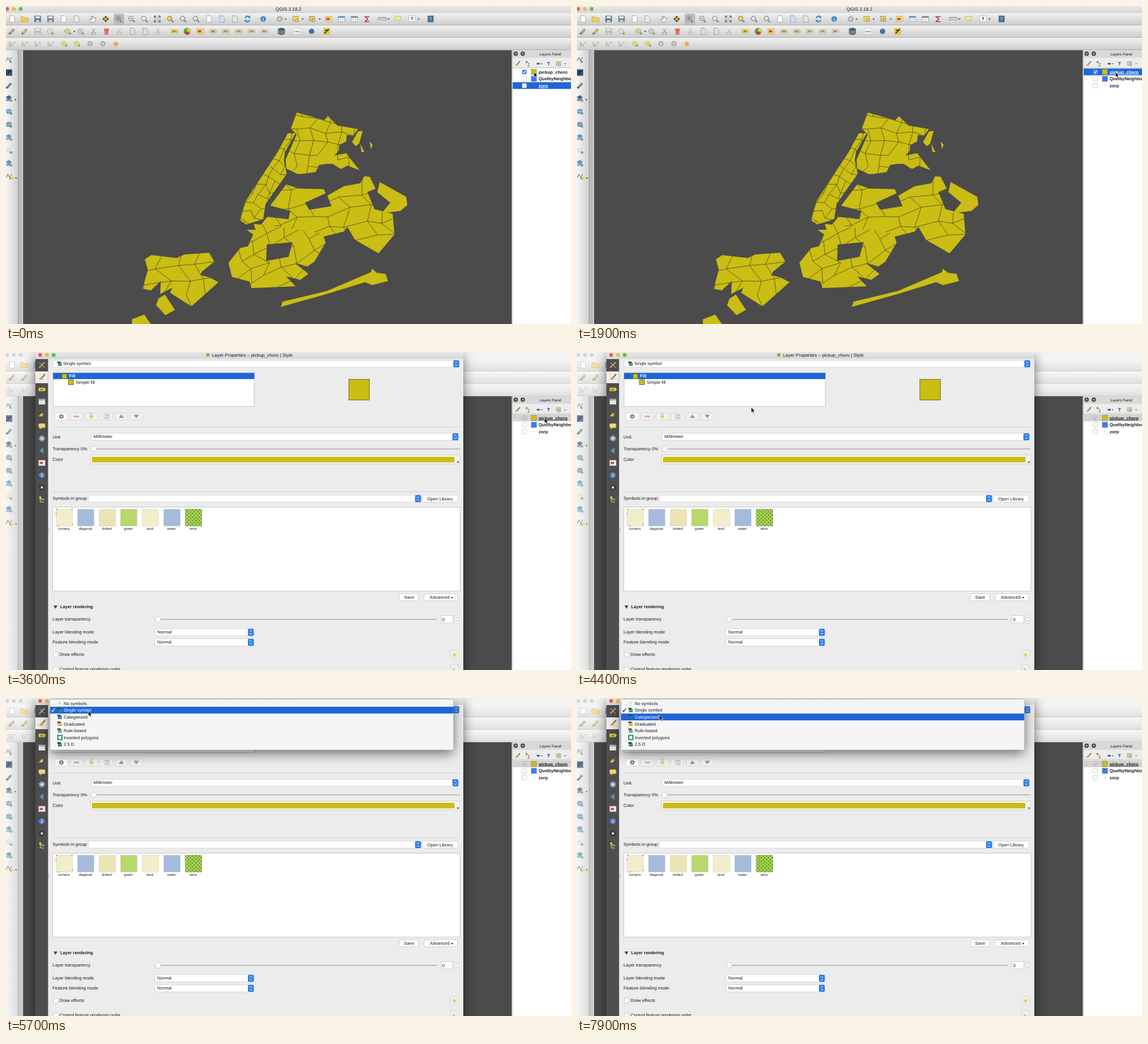
An HTML page that plays this animation: 960 px wide and 540 px high, repeating every 8000 ms.

```html
<!DOCTYPE html>
<html lang="en">
<head>
<meta charset="utf-8">
<title>Layer styling</title>
<style>
html, body { margin: 0; width: 100%; height: 100%; overflow: hidden; background: #4b4b4b; }
svg { display: block; width: 960px; height: 540px; }
text { font-family: "Liberation Sans", Arial, sans-serif; fill: #1c1c1c; text-rendering: geometricPrecision; white-space: pre; }
.timed { animation: 8s step-end infinite; }
.points { animation-name: points; }
.choro { animation-name: choro; }
.dialog { animation-name: dialog; }
.popup { animation-name: popup; }
.single { animation-name: single; }
.categorized { animation-name: categorized; }
.shadow { filter: drop-shadow(0 6px 10px rgba(0,0,0,.55)); }
.cursor { animation: cursor 8s ease-in-out infinite; }
@keyframes points { 0% { opacity: 1 } 5%, to { opacity: 0 } }
@keyframes choro { 0% { opacity: 0 } 5% { opacity: 1 } 44.8%, to { opacity: 0 } }
@keyframes dialog { 0% { opacity: 0 } 44.8%, to { opacity: 1 } }
@keyframes popup { 0% { opacity: 0 } 69.8%, to { opacity: 1 } }
@keyframes single { 0% { opacity: 0 } 69.8% { opacity: 1 } 86%, to { opacity: 0 } }
@keyframes categorized { 0% { opacity: 0 } 86%, to { opacity: 1 } }
@keyframes cursor {
  0%, 12.5% { transform: translate(897px,112px) }
  16.25%, 51.2% { transform: translate(915px,112px) }
  55%, 57.2% { transform: translate(296px,94px) }
  60%, 66.25% { transform: translate(141px,40px) }
  68.75%, 85% { transform: translate(140px,22px) }
  86.25%, to { transform: translate(140px,29px) }
}
</style>
</head>
<body>
<svg id="stage" viewBox="0 0 960 540"></svg>
<script>
const YELLOW = '#cabd13', BLUE = '#1f66d8', DARK = '#4b4b4b', INK = '#1c1c1c';
const BOLD = 'font-weight="700"', MID = 'text-anchor="middle"', WHITE = 'style="fill:#fff"';

const rect = (x, y, w, h, fill, more = '') => `<rect x="${x}" y="${y}" width="${w}" height="${h}" fill="${fill}" ${more}/>`;
const circle = (x, y, r, fill, more = '') => `<circle cx="${x}" cy="${y}" r="${r}" fill="${fill}" ${more}/>`;
const path = (d, fill, more = '') => `<path d="${d}" fill="${fill}" ${more}/>`;
const edge = (color, width = .7) => `stroke="${color}" stroke-width="${width}"`;
const line = (d, color, width = 1) => path(d, 'none', edge(color, width));
const text = (x, y, s, size = 7.55, more = '') => `<text x="${x}" y="${y}" font-size="${size}" ${more}>${s}</text>`;
const group = (inner, more = '') => `<g ${more}>${inner}</g>`;
const timed = (name, inner) => group(inner, `class="timed ${name}"`);

// Each glyph is centred on 0,0 and tinted with one colour.
const glyphs = {
  gap: () => '',
  doc: c => path('M-4-6H2L5-3V6H-4Z', c, edge('#8b8b8b')),
  folder: c => path('M-7-4H-2L0-2H6V5H-7Z', c, edge('#b3923a')),
  disk: c => rect(-6, -6, 12, 12, c, 'rx="1"') + rect(-4, -5, 8, 4, '#e4e8ec') + rect(-3, 2, 6, 4, '#d0d4d8'),
  lens: c => line('M2 2L6 6', '#777', 2) + circle(-1, -1, 4.2, c, edge('#777', 1.1)),
  plus: c => glyphs.lens(c) + line('M-3-1H1M-1-3V1', '#345'),
  minus: c => glyphs.lens(c) + line('M-3-1H1', '#345'),
  hand: c => path('M-3 6L-6 0-2 1-3-5 0-1 0-6 3-1 5-3 5 2 3 6Z', c, edge('#666')),
  cross: c => path('M0-6L6 0 0 6-6 0Z', c) + line('M-5-5L5 5M-5 5L5-5', '#f1d04e', 1.5),
  expand: c => line('M-5-2V-5H-2M2-5H5V-2M5 2V5H2M-2 5H-5V2', c, 2) + circle(0, 0, 2.6, '#dce4ea', edge('#777')),
  ring: c => line('M-4-2A4.5 4.5 0 0 1 4-3M4 2A4.5 4.5 0 0 1-4 3', c, 2.3) + path('M5-6V-1L1-2ZM-5 6V1L-1 2Z', c),
  info: c => circle(0, 0, 5.2, c) + text(0, 3, 'i', 8, `${MID} ${WHITE} ${BOLD}`),
  gear: c => circle(0, 0, 3.4, '#e6e6e6', edge(c, 2.4)) + circle(0, 0, 5.2, 'none', edge(c, 1.6) + ' stroke-dasharray="2 2.1"'),
  select: c => rect(-6, -5, 10, 9, c, edge('#96853a')) + path('M0-1V6L2 4 5 4Z', '#fff', edge('#444')),
  grid: c => rect(-6, -5, 12, 10, '#fff', edge('#888')) + rect(-6, -5, 12, 3, c) + line('M-6 1H6M-2-2V5M2-2V5', '#9aa', .6),
  sigma: c => line('M4-4H-4L1 0-4 5H4', c, 1.6),
  ruler: c => rect(-8, -3, 15, 5, c, edge('#777')) + line('M-5-3V0M-2-3V0M1-3V0M4-3V0', '#777', .7),
  bubble: c => rect(-6, -5, 12, 8, c, 'rx="2" ' + edge('#a39a68', .6)) + path('M-3 3H0L-4 6Z', c),
  letter: c => rect(-7, -6, 12, 11, c, edge('#aaa')) + text(-1, 2, 'T', 8, `${MID} ${BOLD}`),
  book: c => rect(-5, -6, 11, 12, c) + text(0, 3, '?', 9, `${MID} ${WHITE}`),
  pencil: c => line('M-4 5L4-4', '#8b7440', 4) + line('M-4 5L4-4', c, 2.5) + path('M-6 6L-5 2-2 4Z', '#555'),
  cut: c => line('M-3-5L3 3M3-5L-3 3', c) + circle(-3, 4, 1.7, 'none', edge(c)) + circle(3, 4, 1.7, 'none', edge(c)),
  trash: c => path('M-4-3H4L3 6H-3Z', c) + line('M-2-6H2M-1.5-1V4M1.5-1V4', '#f6c9c0', .8) + line('M-5-4H5', c, 1.5),
  tag: c => path('M-6-3H5L7 0 5 3H-6Z', c, edge('#a5943e', .6)) + text(0, 1.6, 'abc', 4.4, MID),
  card: c => rect(-6, -5, 12, 10, c, edge('#aaa')) + rect(-4, -2, 6, 4, '#d5483c'),
  pie: c => circle(0, 0, 6, c, edge('#333', .5)) + path('M0 0V-6A6 6 0 0 1 5 3Z', '#e5cf37') + path('M0 0L5 3A6 6 0 0 1-5 3Z', '#d4352d'),
  db: c => path('M-6-4Q0-8 6-4V4Q0 8-6 4Z', c, edge('#333')) + line('M-6-1Q0 2 6-1M-6 2Q0 5 6 2', '#c7d85a'),
  csw: c => rect(-6, -6, 13, 11, c, edge('#bbb')) + text(0, 2, 'CSW', 4.6, MID),
  dot: c => circle(0, 0, 5, c),
  square: c => rect(-6, -6, 12, 12, c) + line('M-4 4L4-4M-3-2H3', '#222', 1.6),
  bars: c => rect(-6, -5, 2, 11, c) + rect(-3, -1, 2, 7, '#b5b5b5') + rect(0, 1, 2, 5, c) + line('M2-2H7', '#a6a6a6', 1.5),
  node: c => path('M-5-3L0-5 4-2 3 3-2 4-6 1Z', c, edge('#9b9b55')) + circle(4, 4, 2.2, '#77b04c'),
  star: c => path('M0-6L2-2 6-1 3 2 4 6 0 4-4 6-3 2-6-1-2-2Z', c),
  caret: c => path('M-2-1H2L0 2Z', c),
  curve: c => line('M-5 3L-2-4 1 2 5-4', c) + circle(3, 4, 2, '#58a05a'),
  layer: c => path('M-6-3L1-6 5-2-1 2Z', c) + path('M-6 1L4-2V5H-6Z', c, 'opacity=".65"') + circle(4, 4, 2.3, '#83a663'),
  globe: c => circle(0, 0, 5, c) + line('M-5 0H5M0-5Q4 0 0 5Q-4 0 0-5', '#e4edf5', .8) + circle(4, 4, 2.2, '#6da05e'),
  brush: c => line('M1 0L6-6', '#76533a', 2) + path('M-6 4L0-2 3 1 0 5Z', c),
  wrench: c => line('M-5-5L5 5', '#c76b34', 2) + line('M5-5L-5 5', c, 1.8),
  horn: c => path('M-5 0L3-6V6Z', c),
  eye: c => path('M-5 0Q0-5 5 0Q0 5-5 0Z', c) + circle(1, 0, 1.5, '#222'),
  funnel: c => path('M-4-4H4L1 0V4H-1V0Z', c),
  stack: c => rect(-4, -4, 6, 3, '#333') + rect(-3, -2, 7, 2.6, c) + rect(-3, 1, 7, 2.8, c),
  tree: c => line('M-3-5V4H3M-3-1H3', '#ddd') + rect(-5, -6, 4, 4, c) + rect(0, -2, 4, 3, '#dd8e35') + rect(0, 3, 4, 3, '#5f9b4f')
};

const icon = (x, y, kind, color = '#555', scale = .92) => group(glyphs[kind](color), `transform="translate(${x} ${y}) scale(${scale})"`);
// A run of "glyph colour" items at an even pitch, along a row or down a column.
const run = (x, y, dx, dy, spec, scale) => spec.split(',').map((item, i) => {
  const [kind, color] = item.trim().split(' ');
  return icon(x + i * dx, y + i * dy, kind, color, scale);
}).join('');
const row = (x, y, spec, scale) => run(x, y, 21.9, 0, spec, scale);

// Land: an outline filled with a seeded, wobbly mesh of district borders.
let seed = 7;
const random = () => (seed = seed * 16807 % 2147483647) / 2147483647;
let islands = 0;
function island(outline, across = 0, along = across, angle = 0) {
  const d = `M${outline}Z`, shape = path(d, YELLOW);
  if (!across) return shape;
  const v = outline.match(/\d+/g).map(Number);
  const mid = k => { const p = v.filter((_, i) => i % 2 === k); return (Math.min(...p) + Math.max(...p)) / 2; };
  const cx = mid(0), cy = mid(1), n = 9, cos = Math.cos(angle), sin = Math.sin(angle);
  const grid = Array.from({ length: 2 * n }, (_, i) => Array.from({ length: 2 * n }, (_, j) => {
    const wobble = () => (random() - .5) * .5;
    const x = (i - n + wobble() + (j % 2) * .3) * across, y = (j - n + wobble()) * along;
    return (cx + x * cos - y * sin).toFixed(1) + ' ' + (cy + x * sin + y * cos).toFixed(1);
  }));
  let mesh = '';
  for (let i = 1; i < 2 * n; i++) for (let j = 1; j < 2 * n; j++) {
    if (random() < .9) mesh += `M${grid[i][j]}L${grid[i - 1][j]}`;
    if (random() < .85) mesh += `M${grid[i][j]}L${grid[i][j - 1]}`;
  }
  const id = 'land' + islands++;
  return `<clipPath id="${id}">${path(d, '#000')}</clipPath>` + shape + group(line(mesh, '#3d3b20', .7), `clip-path="url(#${id})"`);
}

const bronx = island('494,181 541,194 547,187 563,203 598,209 590,220 579,219 578,230 566,236 566,245 558,254 578,250 592,268 601,279 580,271 569,277 555,268 545,268 532,270 526,282 497,286 476,276 475,261 494,218 484,208', 24, 20, .15)
  + island('598,213 606,212 600,234 594,238 588,231') + island('602,234 609,248 604,248') + island('618,230 623,236 620,243');
const manhattan = island('479,216 492,216 474,248 472,262 477,285 441,336 437,362 408,371 398,364 406,333 430,296 461,249', 17, 13, -1.07);
const queens = island('449,339 476,303 497,310 540,311 543,318 508,334 515,346 553,340 546,322 574,306 602,301 609,289 618,290 628,310 614,316 626,345 657,353 660,388 633,420 593,397 580,375 574,383 538,392 443,404 428,378 444,358 480,362 483,348', 31, 27, -.2)
  + island('635,299 680,324 682,338 670,348 638,352 653,334 631,316');
const brooklyn = island('538,386 543,402 524,434 511,443 490,436 514,455 500,465 476,459 492,476 417,479 414,468 384,460 378,436 398,411 411,408 420,388 409,380 424,380 421,370 441,372', 30, 22, -.5)
  + path('M443,405 487,401 480,426 442,433Z', DARK);
const rockaway = island('467,511 470,502 545,484 620,452 622,446 630,453 645,455 649,467 622,474 610,469 545,489');
const staten = island('236,430 247,423 290,428 303,422 345,419 354,434 333,451 330,457 346,461 361,469 315,510 279,487 283,477 293,473 262,489 263,467 246,483 232,480 241,448', 33, 25, -.15)
  + island('259,497 270,490 287,516 271,525 255,508') + island('214,532 235,524 246,540 214,540');

const defs = `<defs>
<linearGradient id="bar" x2="0" y2="1"><stop stop-color="#f1f1f1"/><stop offset="1" stop-color="#cbcbcb"/></linearGradient>
<linearGradient id="title" x2="0" y2="1"><stop stop-color="#e9e9e9"/><stop offset="1" stop-color="#d6d6d6"/></linearGradient>
<linearGradient id="side"><stop stop-color="#f4f4f4"/><stop offset="1" stop-color="#d0d0d0"/></linearGradient>
<pattern id="dots" width="5" height="5" patternUnits="userSpaceOnUse"><rect width="5" height="5" fill="#f3edbf"/><circle cx="1.2" cy="1.2" r=".6" fill="#bd7b42"/><circle cx="3.7" cy="3.7" r=".6" fill="#a5a13f"/></pattern>
<pattern id="vines" width="6" height="6" patternUnits="userSpaceOnUse"><rect width="6" height="6" fill="#98d94a"/><path d="M1.5 0V2.4M4.5 3V5.4" stroke="#893f32" stroke-width="1.1"/></pattern>
</defs>`;

const lights = (x, colors = ['#f15b51', '#f3b93d', '#58c147']) => colors.map((c, i) => circle(x + i * 11.5, 5, 3.2, c)).join('');
const bar = y => rect(0, y, 960, 21, 'url(#bar)') + rect(0, y + 20.4, 960, .8, '#a7a7a7');
const toolbars = rect(0, 0, 960, 12, 'url(#title)') + bar(12) + bar(33) + bar(54)
  + lights(2) + text(480, 8, 'QGIS 2.18.2', 7.9, MID) + rect(183, 13, 18, 19, '#bcbcbc', 'rx="2"')
  + row(10, 22, 'doc #fff, folder #f2cf50, disk #5d7280, disk #708590, doc #fff, doc #e8eaee')
  + row(147.5, 22, 'hand #fff, cross #454b50, plus #a9cbe8, minus #e4eaf0, lens #eee, expand #55616a, lens #f0d552, lens #dce2e8, lens #dce2e8, doc #fafafa, doc #cce0f0, doc #e0e6ec, ring #3b89c2')
  + run(437, 22, 28, 0, 'info #4c86bd, gear #aaa, select #f3d64b, select #e2c95c') + run(475, 22, 29, 0, 'caret, caret, caret')
  + row(548, 22, 'card #f2d75d, grid #529ad0, grid #888, sigma #b3237b')
  + run(640, 22, 25.5, 0, 'ruler #ddd, bubble #eee4a2, letter #fff') + run(650, 22, 51, 0, 'caret, caret') + icon(721, 22, 'book', '#426d91')
  + row(10, 43, 'pencil #d09d86, pencil #eac44b, disk #bbb, node #dcdcdc') + row(105, 43, 'node #d1ce9c, node #ccc, cut #888, trash #dd5848, cut #aaa, doc #ddd, doc #ddd, cut #aaa')
  + icon(116, 43, 'caret')
  + row(286, 43, 'tag #f2d43e, pie #58a749, card #f2d94e, tag #d9d0a4, tag #d9d0a4, tag #e0d8a6, tag #e0d8a6, tag #e0d8a6')
  + run(468, 43, 25.6, 0, 'db #405f91, csw #fff, dot #3d76a8, square #dec52f')
  + row(10, 64, 'bars #a8c4a0, bars #a8c4a0, bars #a8c4a0, bars #a8c4a0', .82)
  + row(99, 64, 'node #e9dd59, node #e9dd59, gear #aaa, gear #aaa, star #efa53b', .82);

const sideTools = rect(0, 75, 21, 465, 'url(#side)') + rect(21, 75, 8, 465, '#b9b9b9') + rect(20, 75, 1, 465, '#999') + rect(27.5, 75, 1.5, 465, '#d8d8d8')
  + run(5, 91, 0, 22, 'curve #555, square #36547c, pencil #5a96c4, layer #46649e, globe #4c86b5, globe #4c78a7, layer #6298c8, globe #d2dbe2, layer #5d91c2, curve #555')
  + icon(16, 159, 'caret') + icon(11, 292, 'star', '#eed64c', .6) + icon(17, 292, 'caret');

const panel = rect(859, 75, 101, 465, '#fff') + rect(859, 75, 101, 13, '#d9d9d9') + rect(859, 88, 101, 17, '#ececec') + rect(859, 104.5, 101, 1, '#bbb') + rect(859, 75, 1.5, 465, '#aaa')
  + [866, 878].map(x => circle(x, 81, 3.7, '#444') + line(`M${x - 1.4} 79.6l2.8 2.8m0-2.8l-2.8 2.8`, '#fff', .8)).join('')
  + text(925, 83.5, 'Layers Panel', 6.35, MID)
  + run(869, 98, 17.6, 0, 'brush #dfa433, tree #777, eye #4b7fac, funnel #3d83b8, select #c9cfa8', .72) + run(910, 98, 40, 0, 'caret, caret', .72);

const layers = ['pickup_choro', 'QuelbyNeighbo..', 'zorp'];
const layerRows = (active, fill, ink) => layers.map((name, i) => {
  const y = 106.2 + i * 11.6, on = i === active;
  const tint = i ? '#fff' : fill === BLUE ? '#3f86ee' : '#d9d9d9';
  const swatch = i < 2 ? rect(892.5, y + 1.3, 9, 9, i ? '#397af2' : YELLOW, edge('#777', .5)) : circle(897, y + 6, .6, '#777');
  return (on ? rect(861, y, 99, 11.4, fill) : '') + rect(877, y + 2, 7.6, 7.6, tint, 'rx="1.6" ' + edge('#aaa', .6))
    + (i ? '' : line(`M879 ${y + 6}l1.4 1.6 2.4-4`, fill === BLUE ? '#fff' : '#999', 1.1)) + (on && i === 2 ? '' : swatch)
    + text(905, y + 8.3, name, 7.5, `${BOLD} style="fill:${on ? ink : INK}" ${on ? 'text-decoration="underline"' : ''}`);
}).join('');

const combo = (x, y, w, label = '', inset = 4) => rect(x, y, w, 12, '#fff', 'rx="2" ' + edge('#c3c3c3', .6))
  + rect(x + w - 10, y, 10, 12, '#2f7fea', 'rx="2"') + line(`M${x + w - 7} ${y + 4.7}l2-2 2 2m-4 2.6l2 2 2-2`, '#fff')
  + text(x + inset, y + 8.4, label);
const button = (x, y, w, label) => rect(x, y, w, 12, '#fff', 'rx="2" ' + edge('#c2c2c2')) + text(x + w / 2, y + 8.5, label, 7.55, MID);
const slider = (x, y, end) => rect(x, y - 1, end - x, 2, '#bdbdbd') + circle(x + 5.5, y, 4.7, '#fff', edge('#b5b5b5'));
const check = (x, y) => rect(x, y, 8, 8, '#fff', 'rx="1.6" ' + edge('#b3b3b3'));
const swatch = (x, y, s) => rect(x, y, s, s, YELLOW, edge('#5c581c', .8));

const fills = { corners: '#f2edca', diagonal: '#a5bbdc', dotted: 'url(#dots)', green: '#b6d86c', land: '#f2eecb', water: '#a5bbdc', wine: 'url(#vines)' };
const symbols = Object.entries(fills).map(([name, fill], i) => {
  const x = 85 + i * 36.6;
  return rect(x, 267, 28, 28.5, fill, edge(name === 'wine' ? '#474' : '#bbb', .4)) + text(x + 13.2, 302, name, 6, MID)
    + (i ? '' : rect(x, 267, 28, 28.5, 'none', edge('#555', 1) + ' stroke-dasharray="2 24.2"'));
}).join('');

const tools = [0, 1, 2, 3, 4, 5].map(i => rect(83 + i * 25.6, 103.5, 21.5, 12, i ? '#f1f1f1' : '#fff', 'rx="2" ' + edge('#c9c9c9', .6))).join('')
  + icon(94, 109.5, 'gear', '#777', .7) + rect(115, 108, 9, 3, '#eca7a0') + rect(142, 107.5, 6, 5, '#ebc96a') + line('M143 108v-3h4v3', '#bbb')
  + rect(167, 106, 6, 6, '#fff', edge('#999')) + rect(170, 107, 5, 6, '#e6e6d6', edge('#999'))
  + path('M191.5 112h9l-4.5-6Z', '#7a9dce') + path('M217 106.5h9l-4.5 6Z', '#7a9dce');

const backdrop = rect(0, 0, 960, 75, '#fff', 'opacity=".4"') + rect(0, 75, 28, 465, '#fff', 'opacity=".25"')
  + rect(0, 0, 960, 12, '#f3f3f3') + lights(2, Array(3).fill('#d5d5d5'));

const dialog = backdrop + rect(50, 0, 727, 545, '#ececec', 'class="shadow"') + rect(50, 0, 727, 11.5, 'url(#title)')
  + lights(58) + circle(343, 5, 3, '#9fa93a') + text(350, 8, 'Layer Properties – pickup_choro | Style', 7.86)
  + rect(50, 12, 21.5, 528, '#4e4e4e') + rect(50, 33, 21.5, 20, '#ececec')
  + run(61, 22, 0, 20.8, 'wrench #bbb, brush #e2a140, tag #f0d142, grid #aaa, brush #e4bd40, bubble #f2d66d, gear #8eabc9, horn #5c8dbd, card #eee, info #5b8ad0, gear #3c3c3c, tree #e3c044')
  + rect(72.5, 299.5, 1, 5, '#aaa')
  + combo(80, 14, 690, 'Single symbol', 17) + icon(91, 20, 'stack', '#279067')
  + rect(80, 35.5, 342, 57, '#fff', edge('#bbb', .8)) + rect(80, 35.5, 342, 10.5, BLUE) + icon(86, 41, 'caret', '#345')
  + swatch(95, 37, 8.5) + text(107, 43.3, 'Fill', 7.5, `${BOLD} ${WHITE}`) + swatch(106, 47, 8.5) + text(118.5, 53.5, 'Simple fill')
  + swatch(582.5, 46.5, 35) + tools
  + rect(79, 127, 692, .8, '#cfcfcf') + text(79, 146.5, 'Unit') + combo(144.5, 138, 624, 'Millimeter')
  + text(79, 166.5, 'Transparency 0%') + slider(143.5, 164.5, 771)
  + text(79, 185, 'Color') + rect(143.5, 175, 627.5, 15, '#fafafa', edge('#bcbcbc')) + rect(146, 178, 616, 9.5, YELLOW, 'rx="1"') + rect(764.3, 175, .7, 15, '#ccc') + icon(768, 187, 'caret', '#222')
  + rect(79, 237, 692, .8, '#cfcfcf') + text(79, 251.3, 'Symbols in group') + combo(140, 243, 565) + button(707, 243, 61, 'Open Library')
  + rect(79.5, 263.5, 692, 142.5, '#fff', edge('#c0c0c0', .8)) + symbols
  + button(668.5, 410.5, 32.5, 'Save') + button(710.5, 410.5, 57, 'Advanced  ') + icon(758, 417, 'caret', '#222')
  + path('M80.5 430.5h7l-3.5 5.5Z', '#444') + text(92, 435, 'Layer rendering', 7.4, BOLD)
  + text(79, 456.3, 'Layer transparency') + slider(253, 454, 732)
  + rect(739, 447.5, 20, 12.5, '#fff', edge('#c2c2c2')) + text(741, 456.5, '0')
  + rect(762, 447.5, 7, 13, '#fff', 'rx="2.5" ' + edge('#bbb')) + line('M764 452l1.5-1.6 1.5 1.6m-3 4l1.5 1.6 1.5-1.6', '#666', .8)
  + text(79, 477.7, 'Layer blending mode') + combo(253, 470, 168, 'Normal') + text(79, 495, 'Feature blending mode') + combo(253, 487, 168, 'Normal')
  + check(80.5, 510) + text(91, 516, 'Draw effects') + check(80.5, 535) + text(91, 541, 'Control feature rendering order')
  + [507, 531].map(y => rect(755, y, 14, 14, '#f0f0f0', 'rx="1" ' + edge('#ccc'))).join('') + icon(762, 514, 'star', '#efca72', .7) + text(762, 541, 'A↓', 6, MID + ' opacity=".5"');

const choices = ['No symbols', 'Single symbol', 'Categorized', 'Graduated', 'Rule-based', 'Inverted polygons', '2.5 D'];
const tints = ['#ddd', '#279067', '#2873a8', '#e19c33', '#5fa078', '#22965a', '#237b58'];
const choice = (i, ink = INK) => {
  const y = 9 + i * 11.6;
  const mark = i === 0 ? circle(91, y, 2.5, tints[i]) : i === 5 ? rect(88, y - 3.5, 7, 7, '#fff', edge(tints[i], 2)) : icon(91, y, 'stack', tints[i]);
  return (ink === INK ? '' : rect(75, y - 5.8, 685, 11.6, BLUE)) + text(98, y + 2.7, choices[i], 7.55, `style="fill:${ink}"`) + mark
    + (i === 1 ? line(`M77.5 ${y}l1.8 2.6 3.5-5.6`, ink, 1.1) : '');
};
const popup = rect(75, 2.5, 685, 85.5, '#f5f5f5', 'class="shadow"') + rect(75, 2.5, 685, 85.5, 'none', edge('#c4c4c4', .5))
  + choices.map((_, i) => choice(i)).join('') + timed('single', choice(1, '#fff')) + timed('categorized', choice(2, '#fff'));

const pointer = path('M0 0V9L2.1 7.2 3.5 10.4 5 9.7 3.6 6.6H6.4Z', '#111', edge('#fff'));

document.getElementById('stage').innerHTML = defs + rect(0, 0, 960, 540, DARK)
  + bronx + manhattan + queens + brooklyn + rockaway + staten
  + toolbars + sideTools + panel
  + timed('points', layerRows(2, BLUE, '#fff')) + timed('choro', layerRows(0, BLUE, '#fff'))
  + timed('dialog', dialog + layerRows(0, '#d2d2d2', INK))
  + timed('popup', popup) + group(pointer, 'class="cursor"');
</script>
</body>
</html>
```
